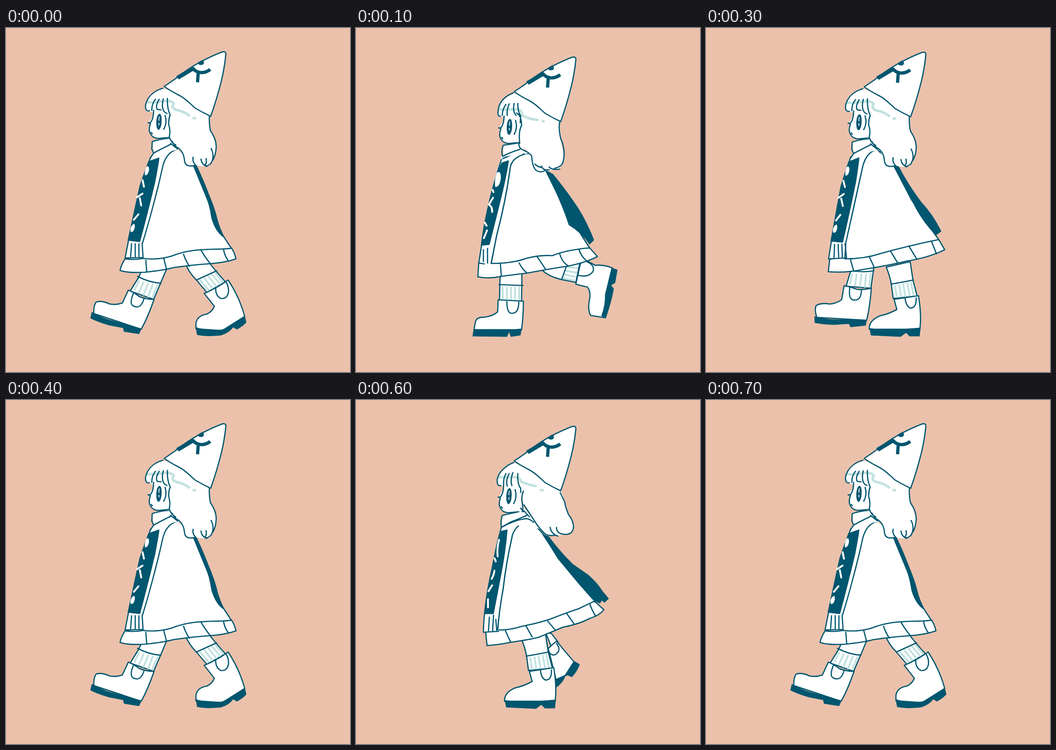
These frames come from a looping animation (748 px wide and 748 px high, 800 ms). An HTML page:

```html
<!DOCTYPE html>
<html lang="en">
<head>
<meta charset="utf-8">
<title>Walk cycle</title>
<style>
html, body { margin: 0; width: 100%; height: 100%; overflow: hidden; background: #ebc1ab; }
svg { display: block; width: 100%; height: 100%; }
path { fill: none; stroke: #00566f; stroke-width: 2.6; stroke-linecap: round; stroke-linejoin: round; }
.w { fill: #fff; }
.f { fill: #fff; stroke: none; }
.d { fill: #00566f; stroke-width: 1.2; }
.b { stroke-width: 7; stroke-linecap: butt; }
.m { stroke: #c2e2df; stroke-width: 4; }
.h { stroke: #c2e2df; stroke-width: 5.5; }
.k { stroke: #fff; stroke-width: 4; }
.thin { stroke-width: 1.8; }
.pose { visibility: hidden; animation: 800ms step-end infinite; }
#contact { animation-name: contact; }
#down { animation-name: down; }
#pass { animation-name: pass; }
#up { animation-name: up; }
@keyframes contact { 0%, 50%, 87.5%, 100% { visibility: visible; } 12.5%, 62.5% { visibility: hidden; } }
@keyframes down { 0%, 25%, 75%, 100% { visibility: hidden; } 12.5%, 62.5% { visibility: visible; } }
@keyframes pass { 0%, 37.5%, 87.5%, 100% { visibility: hidden; } 25%, 75% { visibility: visible; } }
@keyframes up { 0%, 50%, 100% { visibility: hidden; } 37.5% { visibility: visible; } }
</style>
</head>
<body>
<svg viewBox="0 0 748 748">
<defs>
  <g id="hat">
    <path class="w" d="M344 127Q370 110 386 97C412 78 442 63 470 52Q479 50 478 58C476 77 472 100 468 116Q458 156 445 192Q428 184 411 174C400 164 390 153 376 146Q358 137 344 127Z"/>
    <path class="d" d="M371 105L406 84L411 90L376 111ZM417 76L427 70Q432 75 428 79Q422 82 417 76Z"/>
    <path class="b" d="M406 87Q412 96 424 97Q436 97 444 90M418 97L416.500 118"/>
  </g>
  <g id="face">
    <path class="f" d="M321 165L319 192L310 206L314 209L311 224Q316 240 332 240L360 240V165Z"/>
    <path d="M321 179Q321 195 316 203Q313 208 309 206M314 208Q309 222 314 230Q319 240 332 240L354 238M316 227l2 3M346 190Q351 206 343 220"/>
    <path class="d" d="M334 187C340 190 339 216 332 221C325 219 326 190 334 187Z"/>
    <path class="k thin" d="M333.500 193Q332 197 332.500 201M332.500 207V211"/>
  </g>

  <g id="foreLeg">
    <path class="w" d="M295 528L288 543L270 572L321 590L336 555L350 522Z"/>
    <path class="m" d="M289 550L280 569M299 553L289 575M309 556L299 580M319 558L309 584M329 559L319 584"/>
    <path d="M286 540Q310 553 337 555"/>
    <path class="w" d="M266 570L253 598Q238 603 225 600Q208 592 196 596Q190 604 191 621L294 655Q308 630 322 590Q304 590 290 584Q277 574 266 570Z"/>
    <path class="d" d="M187 618Q207 630 225 635L294 654L289 665L257 660L255 652L224 646Q200 639 184 631Z"/>
    <path d="M277 577Q268 599 276 604Q293 613 300 589"/>
  </g>

  <g id="standLeg">
    <path class="w" d="M360 520Q368 540 371 557L375 588L427 583L418 548L412 508Z"/>
    <path class="m" d="M379 561L383 585M388 559L392 584M397 557L401 583M406 555L411 582M414 554L419 580"/>
    <path d="M370 557Q394 553 419 548"/>
    <path class="w" d="M377 590L383 612Q365 622 346 626Q322 636 323 655L433 655Q437 624 430 582Z"/>
    <path class="d" d="M324 653Q350 658 385 656L434 652L432 670L411 670L403 662L391 671L327 668Z"/>
    <path d="M401 588Q403 605 412 609Q426 609 425 587"/>
  </g>

  <g id="scarf">
    <path class="f" d="M321 271L313 283Q298 324 287 365Q271 440 266 464L258 500L299 500L300 466L325 360L346 285L372 264L356 250Z"/>
    <path class="d" d="M310 290L333 282Q332 293 324 335Q308 402 291 465L265 462Q278 402 291 343Q302 311 310 290Z"/>
    <path d="M315 280Q298 324 287 365Q271 440 266 464L259 500L298 499M296 468L298 498M273 469L271 497M281 469V497M289 469L289 497"/>
    <path class="k" d="M297 331L300 345M285 368L297 360M291 370L294 386M278 417L288 405"/>
    <path class="f" d="M305 302Q311 297 311 309Q308 322 302 320Q301 311 305 302ZM275 428Q281 422 280 434Q277 446 271 443Q269 434 275 428Z"/>
  </g>

  <g id="head">
    <path class="f" d="M318 246L356 238L378 264L346 270L321 272Z"/>
    <path d="M354 240Q336 241 318 247L317 263L321 272Q337 263 358 253M321 272L313 284M358 251L373 263"/>
    <path class="f" d="M340 131Q308 143 304 165V180L358 190L355 238Q360 254 376 262Q386 280 389 296Q398 303 412 298Q425 303 443 299Q460 278 456 255Q452 237 444 222L443 190L400 150Z"/>
    <use href="#face"/>
    <path class="f" d="M340 131Q308 143 304 165L304 180L313 180L317 178L340 178L350 187L357 186L380 160Z"/>
    <path class="h" d="M306 161Q326 163 340 159Q358 156 365 164Q358 174 370 178Q386 181 398 190M408 196L411 196"/>
    <path d="M341 131C324 136 309 147 304 165Q301 182 312 180M325 155Q317 164 317 179M333 155Q324 170 329 177L337 178M342 154Q337 174 345 183L350 186M351 153Q350 175 357 189Q353 199 354 211Q358 221 355 237Q360 251 369 254M361 246Q367 258 376 262Q386 270 388 286Q388 299 400 300Q410 300 412 298M407 281Q404 291 414 300M424 285Q426 299 438 300M435 284Q437 294 432 299M442 193Q442 216 445 224Q458 243 457 260Q456 276 450 287M446 262Q455 280 445 295Q438 300 435 301"/>
    <use href="#hat"/>
  </g>
</defs>

<g id="contact" class="pose">
  <path class="w" d="M391 514Q398 532 414 548L437 575L477 552L456 528L440 508Z"/>
  <path class="m" d="M422 548L441 570M431 544L449 566M440 540L457 561M448 536L466 557M456 533L471 552"/>
  <path d="M414 548Q436 538 458 528"/>
  <path class="w" d="M431 577L453 605Q449 616 437 622Q416 625 413 642V654L470 658L519 627Q508 586 483 548Q458 566 431 577Z"/>
  <path class="d" d="M413 651Q440 661 470 656Q488 651 495 643L519 627L522 640Q514 649 502 655L494 650Q485 663 467 668Q435 671 416 667Z"/>
  <path d="M456 564Q455 582 467 588Q482 590 484 572Q484 562 479 553"/>
  <use href="#foreLeg"/>
  <path class="w" d="M259 502Q250 516 248 527Q262 533 302 531Q342 527 364 521Q406 515 437 513Q474 511 500 502Q497 488 490 478L455 474L300 495Z"/>
  <path class="f" d="M372 264Q349 270 341 300Q332 342 319 390Q307 435 299 467L298 501Q330 505 360 496C392 483 420 482 450 481Q473 481 490 479L470 447L440 380L408 299Z"/>
  <path class="d" d="M407 299L415 301Q428 328 441 362Q455 396 459 415Q465 437 475 456Q456 444 447 413Q443 386 437 372Z"/>
  <use href="#scarf"/>
  <path d="M372 264Q349 270 341 300Q332 342 319 390Q307 435 297 467M298 501Q330 505 360 496C392 483 420 482 450 481Q473 481 490 479L469 447M259 502Q278 505 298 501M304 505L306 530M343 501L349 524M386 492Q391 507 399 518M424 483Q434 500 444 512M473 481Q475 495 484 507"/>
  <use href="#head"/>
</g>

<g id="down" class="pose">
  <path class="w" d="M404 526Q420 541 447 547L478 553L487 510L455 505Z"/>
  <path class="m" d="M461 520L481 522M457 528L479 532M454 536L476 541M451 544L474 549"/>
  <path d="M458 517L447 547"/>
  <path class="w" d="M488 512L478 557Q496 562 503 563Q511 573 508 589Q503 611 510 625L542 630L558 522Q538 514 520 516L500 505Z"/>
  <path class="d" d="M556 522L568 526L563 554L554 559L560 567Q555 596 543 630L534 626Q543 602 542 580Z"/>
  <path d="M484 538Q505 543 515 530Q521 516 500 507"/>
  <path class="w" d="M314 512L312 592L360 594L361 520Z"/>
  <path class="m" d="M319 564V588M328 564V589M337 564V590M346 564V590M355 564V590"/>
  <path d="M311 558L363 560"/>
  <path class="w" d="M309 591L308 617Q299 626 279 629Q263 628 260 638Q258 646 257 656L360 656Q364 625 364 594Z"/>
  <path class="d" d="M256 655Q304 661 360 654L357 668L337 671L333 660L328 671L254 670Z"/>
  <path d="M328 595Q328 617 336 620Q354 623 354 596"/>
  <path class="w" d="M267 510L265 541Q289 546 316 540Q346 536 372 533Q424 523 460 518Q500 510 525 497L508 478L440 480L300 502Z"/>
  <path class="w" d="M367 274Q337 283 335 306Q325 379 306 450L294 512Q341 512 370 501Q400 493 427 495Q455 483 508 478Q478 433 440 365L412 309L380 272Z"/>
  <path d="M314 514L316 539M355 511Q360 523 371 532M393 496L412 524M443 491Q448 509 461 517M485 482Q490 497 501 506"/>
  <path class="d" d="M412 309L428 318Q451 346 470 373Q498 411 517 461L508 470Q491 445 463 428Q447 378 412 309Z"/>
  <path class="f" d="M318 276L355 258L375 272Q337 286 334 306Q325 379 306 450L293 511L267 511Q271 470 289 381Q302 317 318 276Z"/>
  <path d="M316 286Q301 332 290 379Q276 438 273 473L267 511L279 513M367 274Q337 283 335 306Q325 379 306 450L294 511M277 482V508M286 479V511M319 284Q340 275 353 268L367 274"/>
  <path class="d" d="M317 293L332 288Q327 323 313 379L290 471L272 473Q279 421 292 367Q303 322 317 293Z"/>
  <path class="f" d="M306 315Q315 308 315 326Q313 345 303 346Q300 332 306 315Z"/>
  <path class="k" d="M297 352L299 357M298 369Q293 377 289 384Q297 389 296 400M280 423L284 430M285 440L278 457"/>
  <path class="f" d="M320 254L358 246L370 272L321 280Z"/>
  <path d="M354 250L320 255Q315 269 319 279Q336 270 356 264"/>
  <path class="f" d="M342 141Q308 155 309 192L358 196L357 255Q377 267 383 287Q388 310 403 312Q425 309 440 307Q456 291 451 272Q444 246 443 203L390 160Z"/>
  <use href="#face" x="1" y="11"/>
  <path class="f" d="M342 141Q308 155 309 192L325 190L359 199L385 165Z"/>
  <path class="h" d="M312 177H346Q362 176 361 190Q376 198 395 200M406 202L408 203"/>
  <path d="M342 141Q315 152 310 174Q306 193 314 192M326 166Q318 177 318 190M333 165Q327 180 329 190M344 164Q340 181 348 190M352 164Q351 180 358 191L357 206M349 185Q360 190 360 212Q353 224 356 251M354 251Q354 263 365 266Q375 270 382 278Q383 300 391 309Q402 316 411 310M389 296Q396 303 405 303M403 300Q407 311 420 308M420 302Q424 309 443 307M443 204Q440 218 445 240Q457 267 450 292Q447 302 432 305"/>
  <use href="#hat" y="11.500"/>
</g>

<g id="pass" class="pose">
  <path class="w" d="M412 505L425 537L440 527L425 508Z"/>
  <path class="w" d="M418 540L436 524Q455 548 474 569L455 599L435 608Z"/>
  <path class="d" d="M435 608Q455 604 463 588L474 568L486 575Q480 591 469 602L460 598L454 601Q451 613 435 625Z"/>
  <path d="M420 548Q424 556 433 554Q443 548 441 538L436 529"/>
  <use href="#standLeg"/>
  <path class="w" d="M282 505L285 534Q312 532 335 527Q378 521 397 516Q424 505 450 494Q486 487 508 475Q530 468 539 456Q530 448 519 438L440 455L308 490Z"/>
  <path class="w" d="M380 262Q349 267 340 294Q326 356 320 410Q310 460 309 500Q333 501 361 492Q402 484 426 475Q462 461 484 454L519 437L485 399L440 345L408 293Z"/>
  <path d="M325 502L336 526M370 492L383 515M417 481L434 501M458 464L475 488M508 443Q513 457 521 470"/>
  <path class="d" d="M406 293L419 297Q440 326 471 357L504 380Q524 397 535 415L549 432L540 440L535 435L530 442L518 436Q502 421 486 399Q442 350 406 293Z"/>
  <path class="f" d="M316 277L354 258L382 262Q349 269 339 301Q321 390 312 456L310 503L277 505Q281 445 295 370Z"/>
  <path d="M316 277Q305 317 296 366Q278 446 277 505L310 503M380 262Q349 267 340 294Q326 356 320 410Q311 460 308 500M290 472L288 502M299 468L297 503M304 477L306 501"/>
  <path class="d" d="M316 285L329 282Q325 333 313 392L299 465L281 465Q284 428 296 370Q304 321 316 285Z"/>
  <path class="k" d="M311 304Q306 323 308 340M301 344L304 351M301 371Q300 380 295 389M296 403L288 416M287 433V451"/>
  <path class="f" d="M318 251L362 230L400 280L345 272L316 277Z"/>
  <path d="M367 242Q344 244 318 251Q314 263 316 277L337 265Q356 258 373 250M316 277Q345 261 369 258Q378 258 386 266"/>
  <path class="f" d="M343 136Q307 151 308 185L361 190L364 226L385 262L412 294Q440 298 467 288Q479 276 464 254Q456 224 446 197L400 160Z"/>
  <use href="#face" y="5"/>
  <path class="f" d="M343 136Q307 151 308 185L325 185L363 200L390 165Z"/>
  <path class="h" d="M310 168H342Q357 166 358 177Q375 185 391 187M402 196H406"/>
  <path d="M343 136C326 142 309 158 307 173Q306 188 315 186M326 160Q320 171 321 184M333 160Q325 175 329 187M341 158Q335 175 339 186M352 160Q350 181 358 192L358 201M364 198Q358 212 362 226L363 240M365 228Q376 244 388 263Q398 279 413 293M409 290Q419 297 432 294M422 277Q425 292 439 296M436 277Q436 291 453 292Q472 294 473 275Q472 261 462 249Q455 232 454 222L444 201M358 235Q362 241 367 243L377 254"/>
  <use href="#hat" y="5.500"/>
</g>

<g id="up" class="pose">
  <use href="#standLeg" x="32"/>
  <use href="#foreLeg" transform="translate(22 -22) rotate(-15 320 530)"/>
  <path class="w" d="M269 503L266 530Q304 533 342 525Q394 517 435 507Q486 499 519 482L506 460L440 470L300 495Z"/>
  <path class="w" d="M372 264Q349 270 341 300Q324 376 304 467L302 502Q345 502 381 490Q438 474 506 460Q478 422 446 372L407 297Z"/>
  <path d="M314 503L321 528M355 497L366 521M401 485L417 511M441 474L458 502M490 463L501 491"/>
  <path class="d" d="M406 297L418 300Q440 342 468 379Q494 407 511 442L500 450Q476 427 456 391Q433 343 406 297Z"/>
  <use href="#scarf" transform="rotate(-2 325 285)"/>
  <path d="M372 264Q349 270 341 300Q324 376 304 467L302 501"/>
  <use href="#head" y="1"/>
</g>
</svg>
</body>
</html>
```
